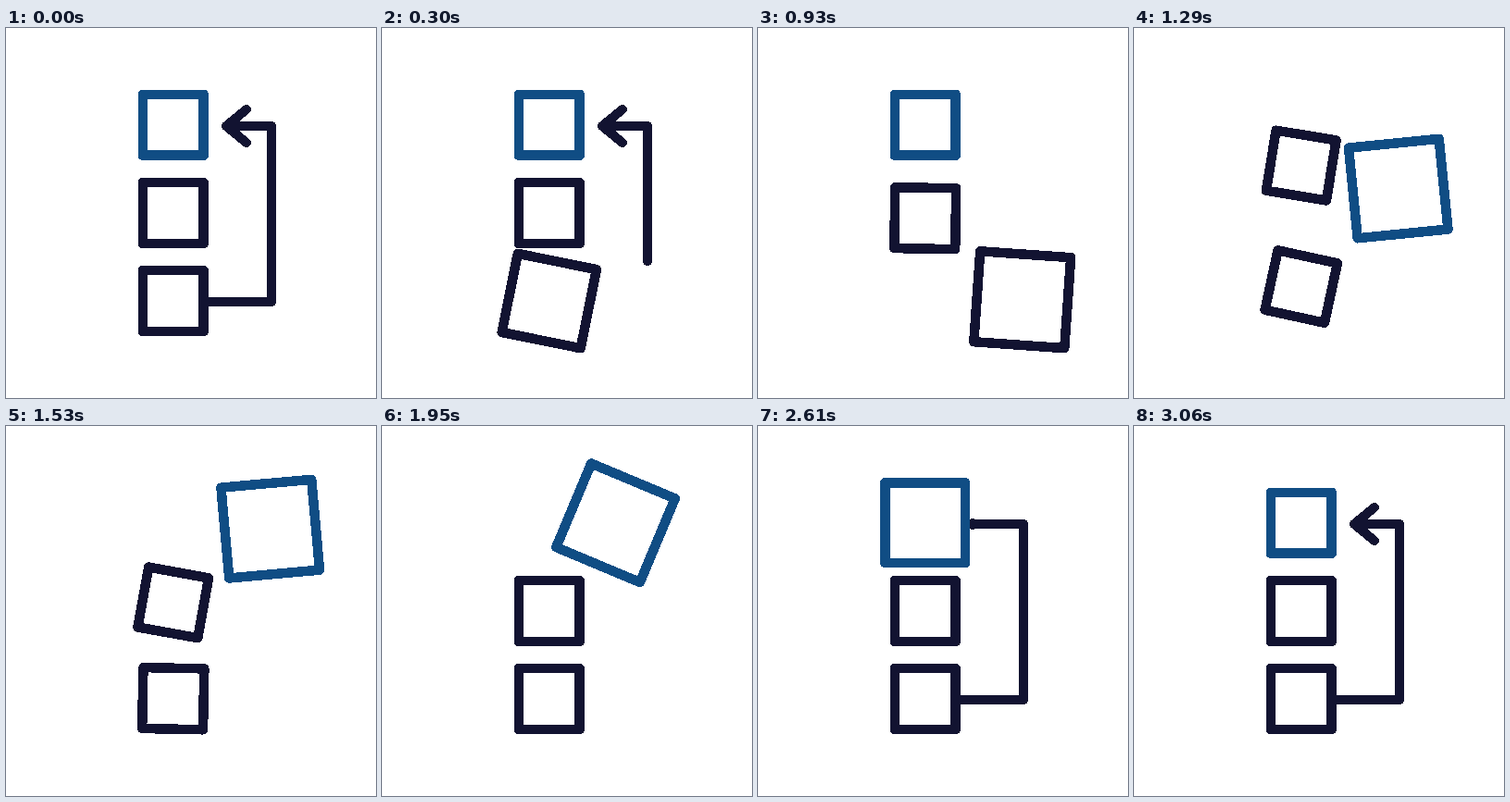
Animation, 400 px wide and 400 px high, one loop 5.63 s. Source, as an HTML page:

```html
<!DOCTYPE html>
<html lang="en">
<head>
<meta charset="utf-8">
<title>Reorder squares</title>
<style>
  html, body { margin: 0; width: 100%; height: 100%; overflow: hidden; background: #fff; }
  svg { display: block; width: 100%; height: 100%; shape-rendering: crispEdges; }
  svg * { fill: none; stroke: #121331; stroke-linecap: round; stroke-linejoin: round; }
  polyline { stroke-width: 10; }
  rect { stroke-width: 10.5; }
</style>
</head>
<body>
<svg viewBox="0 0 400 400">
  <polyline id="shaft"/>
  <polyline id="head"/>
  <rect id="middle"/>
  <rect id="top"/>
  <rect id="mover"/>
</svg>
<script>
const LOOP = 5630, STEP = 30;
const SIDE = 65.9, GROWTH = 32.3, LEFT = 180.75, TRAVEL = 105;
const ROWS = [104.75, 200.05, 295.05];
const DELAY = 185;
const DARK = [18, 19, 49], BLUE = [16, 77, 132];
const el = id => document.getElementById(id);

// Progress 0..1 between two times; skew above 1 lengthens the slowing end.
function ease(time, start, end, skew = 1) {
  const u = Math.min(1, Math.max(0, (time - start) / (end - start)));
  const v = 1 - (1 - u) ** skew;
  return v * v * (3 - 2 * v);
}

const lerp = (from, to, u) => from + (to - from) * u;
const mix = (from, to, u) => `rgb(${from.map((c, i) => Math.round(lerp(c, to[i], u)))})`;

function setAttributes(id, values) {
  for (const name in values) el(id).setAttribute(name, values[name]);
}

function drawSquare(id, x, y, turn, side, color) {
  setAttributes(id, {
    x: -side / 2, y: -side / 2, width: side, height: side,
    transform: `translate(${x} ${y}) rotate(${turn})`
  });
  el(id).style.stroke = color;
}

// Slides one row down, rocking once on the way.
function drawFalling(id, row, time, color) {
  const y = lerp(ROWS[row], ROWS[row + 1], ease(time, 860, 1640, 1.7));
  const rock = Math.min(1, Math.max(0, (time - 870) / 730));
  drawSquare(id, LEFT, y, 13 * Math.sin(Math.PI * rock) ** 2, SIDE, color);
}

// Swings out, up and back in, leaning with each move.
function drawMover(time, color) {
  const x = LEFT + TRAVEL * (ease(time, 480, 870) - ease(time, 1740, 2300));
  const y = lerp(ROWS[2], ROWS[0], ease(time, 900, 1660, 1.25));
  const turn = 21 * ease(time, 30, 540) - 26.7 * ease(time, 540, 1200)
    + 5.7 * ease(time, 1480, 1740)
    + 26 * (ease(time, 1740, 2010) - ease(time, 2010, 2460));
  const side = SIDE + GROWTH * (ease(time, 30, 480) - ease(time, 2310, 3060));
  drawSquare('mover', x, y, turn, side, color);
}

function drawArrow(time) {
  const size = 1 - ease(time, 510, 730) + ease(time, 2550, 2970);
  const tip = 238 - 8 * (1 - size);
  const length = 73 + 190 + 287 - tip;
  const leaving = time < LOOP / 4;
  const start = leaving ? length * ease(time, 30, 680) : 0;
  const end = leaving ? length : length * ease(time, 1950, 2600);
  setAttributes('shaft', {
    points: `214,296 287,296 287,106 ${tip},106`,
    'stroke-dasharray': `${end - start} 999`,
    'stroke-dashoffset': -start,
    visibility: end - start > 0.5 ? 'visible' : 'hidden'
  });

  const back = tip + 22 * size, spread = 18 * size;
  setAttributes('head', {
    points: `${back},${106 - spread} ${tip},106 ${back},${106 + spread}`,
    visibility: size > 0.01 ? 'visible' : 'hidden'
  });
}

function render(time) {
  const swap = ease(time, 1020, 1200);
  drawFalling('middle', 1, time, mix(DARK, DARK, 0));
  drawFalling('top', 0, time - DELAY, mix(BLUE, DARK, swap));
  drawMover(time, mix(DARK, BLUE, swap));
  drawArrow(time);
}

const begin = performance.now();
function tick() {
  const time = (performance.now() - begin) % LOOP;
  render(Math.floor(time / STEP) * STEP);
  requestAnimationFrame(tick);
}
tick();
</script>
</body>
</html>
```
